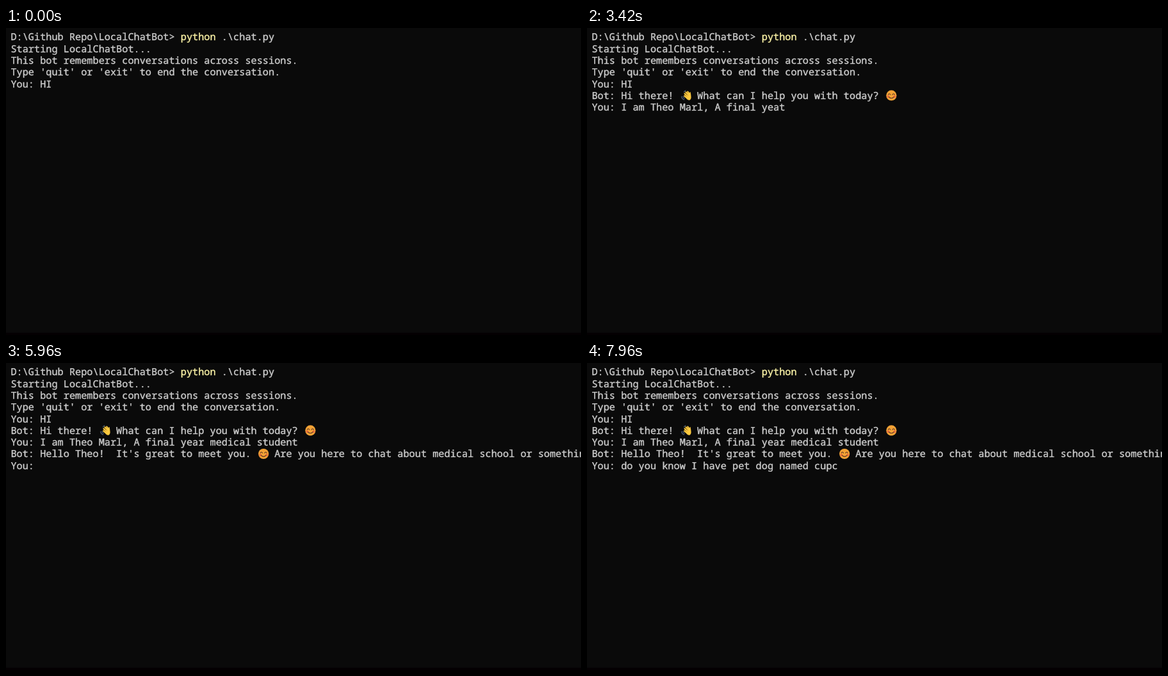
An HTML page for the animation above (8 s loop, 898x480 px).

```html
<!DOCTYPE html>
<html lang="en">
<head>
<meta charset="utf-8">
<title>Terminal chat</title>
<style>
  html, body { margin: 0; width: 100%; height: 100%; overflow: hidden; background: #0a0a0a; }
  svg { display: block; width: 898px; height: 480px; }
  text {
    font: 500 15.25px "Noto Sans Mono", "DejaVu Sans Mono", monospace;
    font-variant-ligatures: none;
    text-rendering: geometricPrecision;
    white-space: pre;
    fill: #ccc;
    stroke: #ccc;
    stroke-width: .4px;
  }
  .cmd { fill: #f9f1a5; stroke: #f9f1a5; }
</style>
</head>
<body>
<svg id="stage" viewBox="0 0 898 480">
  <defs>
    <g id="smile">
      <circle r="8.1" fill="#f3a235"/>
      <circle cx="-5" cy="1.8" r="1.9" fill="#ea6c3c"/>
      <circle cx="5" cy="1.8" r="1.9" fill="#ea6c3c"/>
      <path d="M-5-1.2q1.7-3 3.4 0M1.6-1.2q1.7-3 3.4 0M-3.8 2.4q3.8 4 7.6 0"
            fill="none" stroke="#5a3428" stroke-width="1.1" stroke-linecap="round"/>
    </g>
    <g id="wave">
      <path d="M-2.6-2.6L3 3M-.6-5L4.4 1M2.2-5.8L5.6 0M-3 .8L2 5" stroke="#fcc93f"
            stroke-width="2.3" stroke-linecap="round"/>
      <path d="M-1 2L4.2-2.2Q5.2-6.2 6.4-5.2Q7.4-1 7.5 3Q7 7.6 3.6 7.4Q.8 6.6-1 2Z" fill="#fcc93f"/>
      <path d="M-1.2-.2L1.6 2.6M1-2.2L3.4.6" stroke="#d99a2b" stroke-width=".6"/>
      <path d="M-7.4 1.8q.2 3.6 3.8 4.8M-5.2 1.6q.2 2 2.4 2.8M-3.6-5.2q.6-1.8 2.4-2.2"
            fill="none" stroke="#46566c" stroke-width="1.4" stroke-linecap="round"/>
    </g>
  </defs>
  <rect width="898" height="480" fill="#0a0a0a"/>
  <rect y="476.5" width="898" height="3.5" fill="#040002"/>
</svg>
<script>
const LOOP = 8000, LEFT = 7.4, TOP = 5.2, CELL = 9.15, LINE = 18.3, BASE = 14.1;
const stage = document.getElementById('stage');
const EMOJI = { '{~': '#wave', '{^': '#smile' };

const intro = [
  'D:\\Github Repo\\LocalChatBot> ',
  'Starting LocalChatBot...',
  'This bot remembers conversations across sessions.',
  "Type 'quit' or 'exit' to end the conversation.",
  'You: HI'
];

// keys: [ms, cells shown]; emoji marks take two cells
const chat = [
  { text: 'Bot: Hi there! {~ What can I help you with today? {^', stream: true,
    keys: [[0, 0], [740, 0], [1285, 52]] },
  { text: 'You: I am Theo Marl, A final year medical student',
    typo: { until: 3590, from: 'year', to: 'yeat' },
    keys: [[1440, 5], [1640, 5], [2170, 14], [2250, 15], [3000, 25], [3400, 33],
           [3540, 33], [3541, 32], [3620, 32], [3660, 33], [4500, 49]] },
  { text: "Bot: Hello Theo!  It's great to meet you. {^ Are you here to chat about medical school or something else?",
    stream: true, keys: [[4600, 0], [5425, 0], [5745, 106]] },
  { text: 'You: do you know I have pet dog named cupc',
    keys: [[5960, 5], [6060, 5], [6630, 18], [6670, 19], [7460, 33], [7950, 42]] }
];

const blink = [[500, 1020], [1560, 2330], [2800, 3330], [3900, 4750],
               [5450, 5900], [6420, 6950], [7400, 7900]];

function add(tag, attrs, parent = stage) {
  const el = document.createElementNS('http://www.w3.org/2000/svg', tag);
  for (const k in attrs) el.setAttribute(k, attrs[k]);
  return parent.appendChild(el);
}

const colX = col => LEFT + CELL * col;
const rowY = row => TOP + LINE * row;
const addLine = (row, col = 0) => add('text', { x: colX(col), y: rowY(row) + BASE });

intro.forEach((s, i) => { addLine(i).textContent = s; });
const command = addLine(0, intro[0].length);
add('tspan', { class: 'cmd' }, command).textContent = 'python';
command.append(' .\\chat.py');

chat.forEach((line, i) => {
  line.row = intro.length + i;
  line.el = addLine(line.row);
  line.marks = [...line.text.matchAll(/\{./g)].map(m => ({
    col: m.index,
    el: add('use', { href: EMOJI[m[0]], x: colX(m.index) + 10.5, y: rowY(line.row) + 8.7 })
  }));
  line.ends = [...line.text.matchAll(/\S+/g)].map(m => m.index + m[0].length);
});

const cursor = add('rect', { width: 1.2, height: LINE, fill: '#f2f2f2' });

function cellsAt(line, t) {
  const { keys } = line;
  if (t < keys[0][0]) return 0;
  const next = keys.findIndex(k => k[0] > t);
  let n = keys[keys.length - 1][1];
  if (next > 0) {
    const [t0, n0] = keys[next - 1], [t1, n1] = keys[next];
    n = Math.floor(n0 + (n1 - n0) * (t - t0) / (t1 - t0) + 1e-6);
  }
  return line.stream ? Math.max(0, ...line.ends.filter(e => e <= n)) : n;
}

function draw(t) {
  for (const line of chat) {
    const n = cellsAt(line, t);
    let s = line.text;
    if (line.typo && t < line.typo.until) s = s.replace(line.typo.from, line.typo.to);
    s = s.slice(0, n).replace(/\{./g, '  ');
    if (line.el.textContent !== s) line.el.textContent = s;
    for (const m of line.marks) m.el.style.display = n > m.col ? '' : 'none';
    if (t >= line.keys[0][0]) {
      cursor.setAttribute('x', colX(n) - 0.2);
      cursor.setAttribute('y', rowY(line.row));
    }
  }
  cursor.style.display = blink.some(([a, b]) => t >= a && t < b) ? '' : 'none';
}

function tick() {
  draw(performance.now() % LOOP);
  requestAnimationFrame(tick);
}
tick();
</script>
</body>
</html>
```
